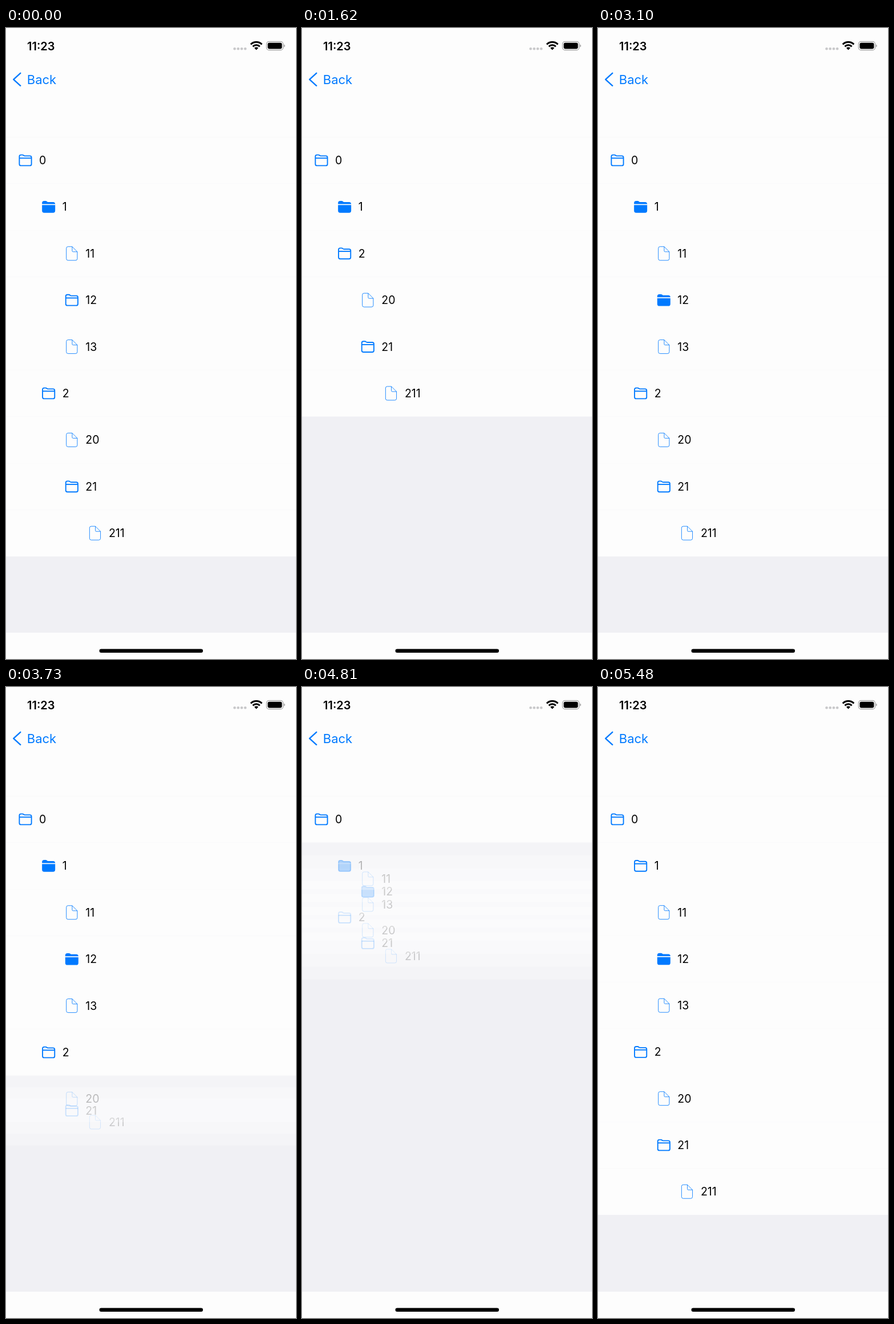
Recreate the animation shown at these times as an HTML page with a canvas. Size 508 px wide and 1102 px high, loop 5.52 s.

```html
<!DOCTYPE html>
<html lang="en">
<head>
<meta charset="utf-8">
<title>Folder tree</title>
<style>
  html, body { margin: 0; width: 100%; height: 100%; overflow: hidden; }
  canvas { display: block; }
</style>
</head>
<body>
<canvas id="stage" width="508" height="1102"></canvas>
<script>
const ctx = document.getElementById('stage').getContext('2d');
const LOOP = 5520, STEP = 44.96, DURATION = 300;
const PITCH = 81.4, TOP = 231, INDENT = 40.65;
const BLUE = '#007aff', WHITE = '#fdfdfd', GRAY = '#f0f0f4', BLACK = '#000';

const rows = [
  ['0', 0], ['1', 1], ['11', 2], ['12', 2], ['13', 2],
  ['2', 1], ['20', 2], ['21', 2], ['211', 3]
].map(([label, level]) => ({ label, level }));
const leaves = ['11', '13', '20', '211'];

// Each fold: parent row, number of descendants, start of collapse and of expansion
const folds = [
  { parent: 1, count: 3, close: 1288, open: 2164 },
  { parent: 5, count: 3, close: 3140, open: 3628 },
  { parent: 0, count: 8, close: 4620, open: 5194 }
];

const folderShape = new Path2D(
  'M-10.6-6.6Q-10.6-9.4-7.8-9.4H-5.2Q-4.2-9.4-3.4-8.7L-2.9-8.2Q-2.2-7.6-1.2-7.6' +
  'H7.8Q10.6-7.6 10.6-4.8V6.7Q10.6 9.4 7.8 9.4H-7.8Q-10.6 9.4-10.6 6.7Z');
const divider = new Path2D('M-10.6-3.7H10.6');
const docShape = new Path2D(
  'M.6-12H-6.6Q-9.6-12-9.6-9V9Q-9.6 12-6.6 12H6.6Q9.6 12 9.6 9V-3Z' +
  'M.6-12V-4.6Q.6-3 2.2-3H9.6');

// cubic-bezier(.42, 0, .58, 1)
function easeInOut(x) {
  if (x <= 0) return 0;
  if (x >= 1) return 1;
  let low = 0, high = 1, s;
  for (let i = 0; i < 20; i++) {
    s = (low + high) / 2;
    if (1.26 * s - .78 * s * s + .52 * s ** 3 < x) low = s; else high = s;
  }
  return s * s * (3 - 2 * s);
}

function stroke(path, color, width) {
  ctx.strokeStyle = color;
  ctx.lineWidth = width;
  ctx.stroke(path);
}

function text(string, x, y, size, color, weight = 400) {
  ctx.font = `${weight} ${size}px Inter, sans-serif`;
  ctx.fillStyle = color;
  ctx.fillText(string, x, y);
}

function pill(x, y, w, h, r, color) {
  ctx.beginPath();
  ctx.roundRect(x, y, w, h, r);
  ctx.fillStyle = color;
  ctx.fill();
}

function drawIcon(label, t) {
  const filled = label === '1' && t < 5050 || label === '12' && t > 1700;
  if (leaves.includes(label)) {
    stroke(docShape, BLUE, .85);
  } else if (filled) {
    ctx.fillStyle = BLUE;
    ctx.fill(folderShape);
    stroke(folderShape, BLUE, 1.8);
    ctx.fillStyle = WHITE;
    ctx.fillRect(-12, -4.9, 24, 1.7);
  } else {
    stroke(folderShape, BLUE, 1.9);
    stroke(divider, BLUE, 1.9);
  }
}

function drawRow({ label, level }, y, alpha, t) {
  ctx.save();
  ctx.globalAlpha = alpha;
  ctx.fillStyle = WHITE;
  ctx.fillRect(0, y - PITCH / 2, 508, PITCH);
  ctx.translate(level * INDENT, y);
  text(label, 58, 7, 19.5, BLACK);
  ctx.translate(34, 0);
  drawIcon(label, t);
  ctx.restore();
}

function drawTree(t) {
  const fold = folds.findLast(f => t >= f.close) || folds[0];
  const { parent, count, close, open } = fold;
  const shown = 1 - easeInOut((t - close) / DURATION) + easeInOut((t - open) / DURATION);
  const last = parent + count;
  const inside = i => i > parent && i <= last;

  // Folding rows lie below the others, the first of them uppermost
  for (let i = last; i > parent; i--) {
    const y = TOP + PITCH * (parent + 1 + (i - parent - 1) * shown);
    if (shown > 0) drawRow(rows[i], y, shown, t);
  }
  rows.forEach((row, i) => {
    if (inside(i)) return;
    const lift = i > last ? count * (1 - shown) : 0;
    drawRow(row, TOP + PITCH * (i - lift), 1, t);
  });
}

function drawStatusBar() {
  text('11:23', 37, 38.5, 20, BLACK, 600);
  for (let i = 0; i < 4; i++) pill(398.2 + i * 6.2, 34, 4.6, 4.6, 2.3, '#c8c8ca');

  // Wi-Fi
  const from = -Math.PI * .75, to = -Math.PI * .25;
  ctx.strokeStyle = ctx.fillStyle = BLACK;
  ctx.lineWidth = 3;
  for (const radius of [8.6, 13.8]) {
    ctx.beginPath();
    ctx.arc(438.5, 38.4, radius, from, to);
    ctx.stroke();
  }
  ctx.beginPath();
  ctx.moveTo(438.5, 38.6);
  ctx.arc(438.5, 38.4, 5, from, to);
  ctx.fill();

  // Battery
  const shell = new Path2D();
  shell.roundRect(456.3, 23.6, 29.2, 15, 4.5);
  stroke(shell, '#a2a2a2', 1.2);
  pill(458.4, 25.8, 25, 10.6, 2.8, BLACK);
  pill(486.8, 28.7, 1.8, 4.8, [0, 2, 2, 0], '#a2a2a2');
}

function draw(t) {
  ctx.fillStyle = WHITE;
  ctx.fillRect(0, 0, 508, 1102);
  ctx.fillStyle = GRAY;
  ctx.fillRect(0, 190, 508, 866);
  drawTree(t);
  drawStatusBar();
  ctx.lineCap = ctx.lineJoin = 'round';
  stroke(new Path2D('M25.3 78.8L13.2 89.8L25.3 100.8'), BLUE, 2.4);
  ctx.lineCap = 'butt';
  text('Back', 36.8, 98, 22, BLUE);
  pill(163.5, 1084.4, 181.5, 6.6, 3.3, BLACK);
}

// The screen refreshes at a fixed, low rate
function tick() {
  const t = performance.now() % LOOP;
  draw(Math.floor((t + 6) / STEP) * STEP);
  requestAnimationFrame(tick);
}
tick();
</script>
</body>
</html>
```
